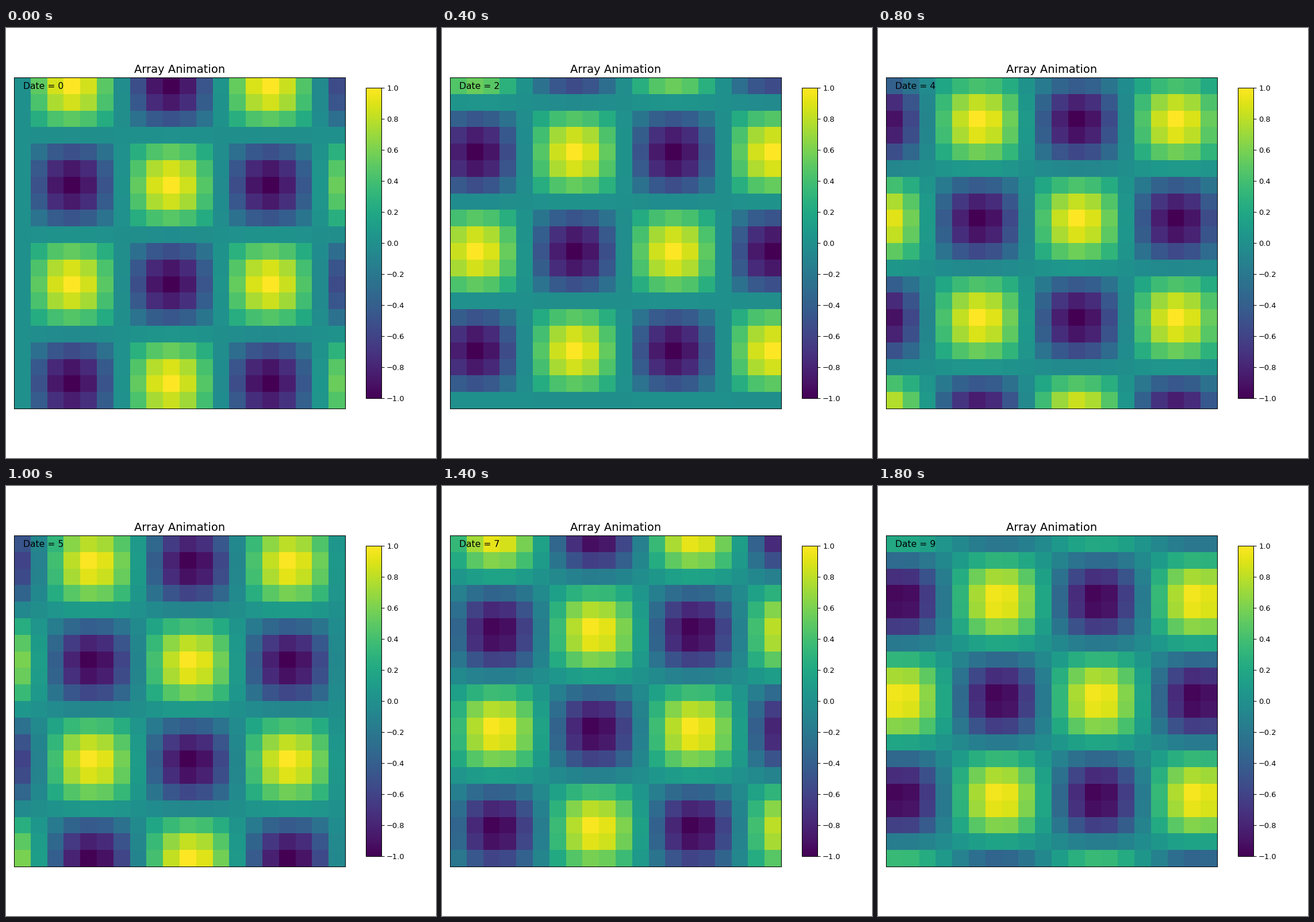
A matplotlib script that plays this animation: 748 px wide and 748 px high, repeating every 2 s.

```python
import numpy as np
import matplotlib.pyplot as plt
from matplotlib.animation import FuncAnimation

STAGE = 748
DPI = 93.5
FRAMES = 10
INTERVAL = 200
PAD = 1.08 * 10 * DPI / 72
BOX = STAGE - 2 * PAD

plt.rcParams["font.family"] = "DejaVu Sans"


def add_axes(left, width, height):
    """Axes in pixels, centred vertically on the stage."""
    bottom = (STAGE - height) / 2
    return fig.add_axes([v / STAGE for v in (left, bottom, width, height)])


def wave(date):
    phase = grid + 0.5 * date
    return np.outer(np.cos(phase), np.sin(phase))


fig = plt.figure(figsize=(STAGE / DPI, STAGE / DPI), dpi=DPI, facecolor="white")
grid = np.linspace(0, 10, 20)

ax = add_axes(PAD, 0.8 * BOX, 0.8 * BOX)
image = ax.imshow(wave(0), cmap="viridis", vmin=-1, vmax=1,
                  interpolation="nearest", aspect="auto")
ax.set_xticks([])
ax.set_yticks([])
ax.set_title("Array Animation", fontsize=15)
label = ax.annotate("Date = 0", xy=(0, 1), xycoords="axes fraction",
                    xytext=(12, -12), textcoords="offset points",
                    ha="left", va="center", fontsize=12)

bar_height = 0.75 * BOX
bar_ax = add_axes(PAD + 0.85 * BOX, bar_height / 20, bar_height)
bar = fig.colorbar(image, cax=bar_ax)
bar.set_ticks(np.linspace(-1, 1, 11))
bar.ax.tick_params(labelsize=10)


def update(date):
    image.set_data(wave(date))
    label.set_text(f"Date = {date}")
    return image, label


anim = FuncAnimation(fig, update, frames=FRAMES, interval=INTERVAL, repeat=True)
plt.show()
```
